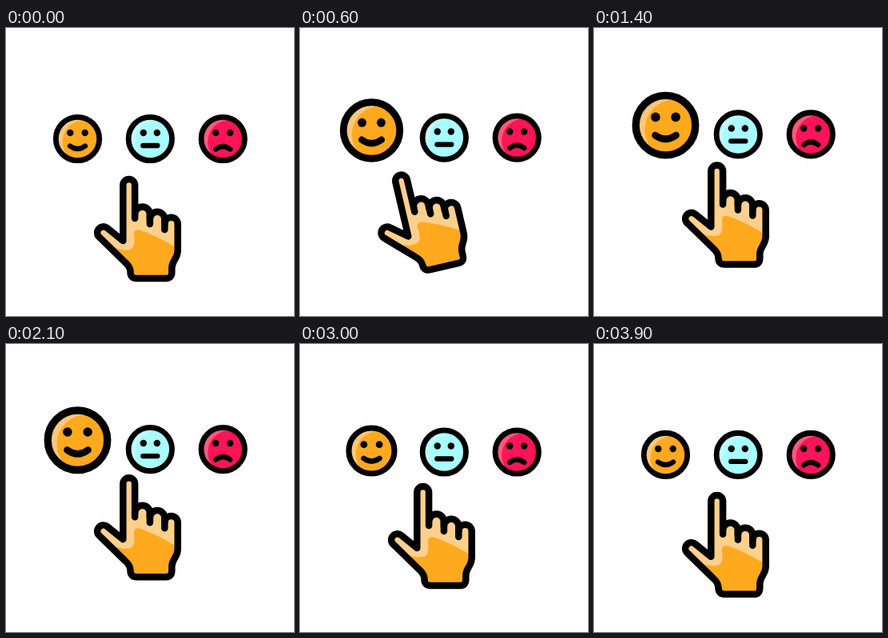
Write an HTML page that moves like this. It is 360 by 360 pixels and loops after 4 s.

```html
<!DOCTYPE html>
<html lang="en">
<head>
<meta charset="utf-8">
<title>Rating tap</title>
<style>
  html, body { margin: 0; height: 100%; overflow: hidden; background: #fff; }
  svg { display: block; width: 100vw; height: 100vh; }
  .line { fill: none; stroke: #000; stroke-linecap: round; stroke-linejoin: round; }
</style>
</head>
<body>
<svg viewBox="0 0 360 360">
  <defs>
    <clipPath id="disc"><circle r="27.2"/></clipPath>
    <path id="palm" d="M146.300 266V196.500A7.400 7.400 0 0 1 161.100 196.500V233A9.400 9.400 0 0 1 179.900 233V239A9.200 9.200 0 0 1 198.300 239V245A8.200 8.200 0 0 1 214.700 245V278C214.700 289 207.500 290 207.300 300V305Q207.300 313 200 313H163.500Q155.500 313 155.500 305C155.500 299 152 295.500 148.500 292.500L117 261.800A7.300 7.300 0 0 1 126.500 250Z"/>
    <clipPath id="inside"><use href="#palm"/></clipPath>
  </defs>
  <g id="faces"></g>
  <g id="hand">
    <use href="#palm" fill="#ffd08c"/>
    <path clip-path="url(#inside)" fill="#ffa91e" d="M132 274Q150 280 157 276Q162 271 160 258Q160 251 167 252.500Q190 260 220 279V320H132Z"/>
    <path class="line" stroke-width="8.500" d="M161.100 233V238M179.900 233V245M198.300 239V252"/>
    <use href="#palm" class="line" stroke-width="8.500"/>
  </g>
</svg>
<script>
const LOOP = 4000;
const TAPS = [0, 2100], TAP_TIME = 800;
const FACE_R = 30.5;
const GROWTH = 0.37;
// [time, growth] pairs for the tapped face
const GROW_KEYS = [[0, 0], [300, 0], [400, 1], [500, 1], [600, 0.8], [800, 1],
  [2550, 1], [2700, 0], [2800, 0], [2950, 0.18], [3100, 0], [LOOP, 0]];

const faces = [
  { x: 89.5, color: '#ffa91e', light: '#ffc779', eye: 9.2, mouth: 'M-9.500 9Q0 16 9.500 9' },
  { x: 180.3, color: '#a8fcff', light: '#bffdff', eye: 8.5, mouth: 'M-9 8.500H9' },
  { x: 271.2, color: '#ff1457', light: '#ff5a7c', eye: 9, mouth: 'M-9 13Q0 6 9 13' }
];

const group = document.getElementById('faces');
const hand = document.getElementById('hand');

group.innerHTML = faces.map(f => `<g>
  <circle r="27.200" fill="${f.light}"/>
  <circle cx="8.500" cy="4" r="27.500" fill="${f.color}" clip-path="url(#disc)"/>
  <circle class="line" r="27.200" stroke-width="6.800"/>
  <circle cx="${-f.eye}" cy="-7.500" r="4.200"/>
  <circle cx="${f.eye}" cy="-7.500" r="4.200"/>
  <path class="line" stroke-width="6.300" d="${f.mouth}"/>
</g>`).join('');

const smooth = p => p * p * (3 - 2 * p);

function growthAt(t) {
  const i = GROW_KEYS.findIndex(key => key[0] > t);
  const [t0, a] = GROW_KEYS[i - 1], [t1, b] = GROW_KEYS[i];
  return a + (b - a) * smooth((t - t0) / (t1 - t0));
}

function tapAt(t) {
  const start = TAPS.find(s => t >= s && t < s + TAP_TIME);
  return start === undefined ? 0 : Math.sin(Math.PI * (t - start) / TAP_TIME) ** 2.5;
}

function draw(now) {
  const t = now % LOOP;
  const wave = Math.cos(2 * Math.PI * t / LOOP);

  // Faces stand on their lower edge, so growth pushes upward
  const floor = 135 + 3.5 * wave + FACE_R;
  faces.forEach((f, i) => {
    const scale = i ? 1 : 1 + GROWTH * growthAt(t);
    group.children[i].setAttribute('transform',
      `translate(${f.x} ${floor - FACE_R * scale}) scale(${scale})`);
  });

  // The hand tilts first, then pushes up to the face
  const tap = tapAt(t);
  const x = 4 * tap ** 5, y = 11 * (wave - 1) - 42 * tap ** 5;
  hand.setAttribute('transform',
    `translate(${x} ${y}) rotate(${-31.7 * tap} 138.5 313.5)`);
  requestAnimationFrame(() => draw(performance.now()));
}
draw(0);
</script>
</body>
</html>
```
